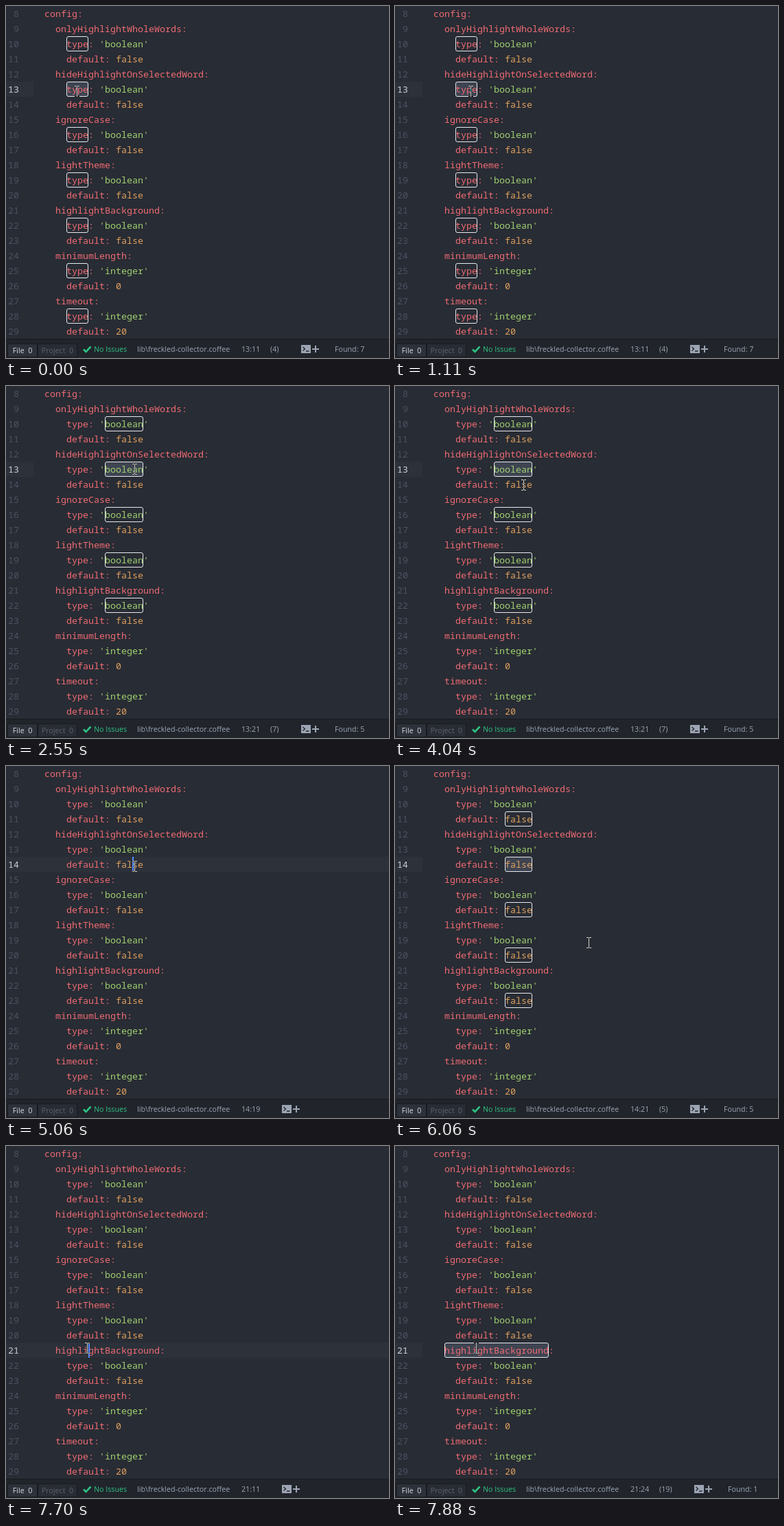
These frames come from a looping animation (558 by 512 pixels, 8 s). An HTML page:

```html
<!DOCTYPE html>
<html lang="en">
<head>
<meta charset="utf-8">
<title>Editor selection</title>
<style>
html, body { margin: 0; width: 100%; height: 100%; overflow: hidden; background: #282c34; }
#stage { position: relative; width: 558px; height: 512px; overflow: hidden; background: #282c34; isolation: isolate; }
#stage * { position: absolute; box-sizing: border-box; }
pre { margin: 0; top: 0; font: 13.333px/22px "Noto Sans Mono", monospace; font-variant-ligatures: none; }
#stage pre span { position: static; }
#nums { width: 19px; text-align: right; color: #4b5263; }
#nums .on { color: #c8cdd6; }
#code { left: 40px; color: #ef6b73; }
.str { color: #a0d070; }
.num { color: #e0a060; }
#line { left: 0; height: 22px; background: #2c313a; }
.box { height: 22px; border: 1px solid #e6e8ec; border-radius: 3px; }
.sel { background: #3e4451; }
#caret { width: 2px; height: 22px; background: #528bff; }
#bar { left: 0; top: 484px; width: 558px; height: 28px; background: #21252b; border-top: 1px solid #181a1f;
  font: 10.7px/16px "Open Sans", "Noto Sans", sans-serif; color: #9da5b4; }
#bar span { top: 6px; white-space: pre; }
#bar .tab { top: 6px; height: 20px; line-height: 18px; border: 1px solid #181a1f; text-align: center; }
#ibeam { left: 0; top: 0; mix-blend-mode: difference; }
</style>
</head>
<body>
<div id="stage">
  <div id="line"></div>
  <div id="boxes"></div>
  <pre id="nums"></pre>
  <pre id="code"></pre>
  <div id="caret"></div>
  <div id="bar">
    <span class="tab" style="left:2px;width:44px;background:#2c313a;color:#d7dae0">File  0</span>
    <span class="tab" style="left:46px;width:58px;background:#282c34;color:#5c6370">Project  0</span>
    <svg style="left:112px;top:9px" width="13" height="11"><path d="M1 5.5l3.5 3.5L11.5 1.5" fill="none" stroke="#2fc283" stroke-width="2.6"/></svg>
    <span style="left:128px;color:#2fc283">No Issues</span>
    <span style="left:191px">lib\freckled-collector.coffee</span>
    <span id="pos" style="left:343px"></span>
    <span id="count" style="left:385px"></span>
    <svg id="icons" style="top:8px" width="28" height="13">
      <path d="M0 0h14v12H0z" fill="#9da5b4"/>
      <path d="M2.5 3l3 2.7-3 2.7M7 9h4.5" fill="none" stroke="#21252b" stroke-width="1.3"/>
      <path d="M21 1v10M16 6h10" stroke="#9da5b4" stroke-width="2"/>
    </svg>
    <span id="found"></span>
  </div>
  <svg id="ibeam" width="7" height="16"><path d="M0 .5h3M4 .5h3M3.5 1v14M0 15.5h3M4 15.5h3" stroke="#fff"/></svg>
</div>
<script>
const $ = id => document.getElementById(id);
const FIRST = 8, ROW = 22, COL = 8, LEFT = 40, LOOP = 8000;

const options = [
  ["onlyHighlightWholeWords", "'boolean'", "false"],
  ["hideHighlightOnSelectedWord", "'boolean'", "false"],
  ["ignoreCase", "'boolean'", "false"],
  ["lightTheme", "'boolean'", "false"],
  ["highlightBackground", "'boolean'", "false"],
  ["minimumLength", "'integer'", "0"],
  ["timeout", "'integer'", "20"]
];
const lines = ["  config:", ...options.flatMap(([key, type, value]) =>
  [`    ${key}:`, `      type: ${type}`, `      default: ${value}`])];

$("code").innerHTML = lines.join("\n")
  .replace(/: ('\w+')/g, ': <span class="str">$1</span>')
  .replace(/: (\w+)/g, ': <span class="num">$1</span>');
$("nums").innerHTML = lines.map((_, i) => `<span>${i + FIRST}</span>`).join("\n");

// Editor states: start time, row, column, selected word (if any), x of the status icons
const states = [
  [0, 13, 11, "type", 430],
  [2380, 13, 19, "", 402],
  [2550, 13, 21, "boolean", 430],
  [5060, 14, 19, "", 402],
  [5230, 14, 21, "false", 430],
  [7700, 21, 11, "", 402],
  [7880, 21, 24, "highlightBackground", 436]
];

const linear = p => p;
const smooth = p => p * p * (3 - 2 * p);
// Pointer keys: time, left, top, easing used to arrive
const keys = [
  [0, 100, 116], [980, 100, 116], [1720, 184, 113, smooth],
  [3630, 184, 113], [4120, 184, 138, smooth],
  [5780, 184, 138], [6060, 279, 249], [6230, 308, 269],
  [6560, 308, 269], [7040, 115, 285, smooth],
  [7229, 115, 285], [7230, 115, 286], [LOOP, 115, 286]
];

function showState([, row, col, word, iconX]) {
  const top = (row - FIRST) * ROW;
  const boxes = [];
  if (word) lines.forEach((text, i) => {
    const at = text.search(new RegExp(`\\b${word}\\b`));
    if (at < 0) return;
    boxes.push(`<div class="box${i === row - FIRST ? " sel" : ""}" style="left:${LEFT + at * COL}px;` +
      `top:${i * ROW}px;width:${word.length * COL}px"></div>`);
  });
  $("boxes").innerHTML = boxes.join("");
  $("line").style.top = $("caret").style.top = top + "px";
  $("line").style.width = word ? LEFT + "px" : "100%";
  $("caret").style.left = LEFT + (col - 1) * COL + "px";
  $("caret").hidden = !!word;
  [...$("nums").children].forEach((n, i) => n.classList.toggle("on", i === row - FIRST));
  $("pos").textContent = `${row}:${col}`;
  $("count").textContent = word && `(${word.length})`;
  $("icons").style.left = iconX + "px";
  $("found").style.left = iconX + 49 + "px";
  $("found").textContent = word && `Found: ${boxes.length}`;
}

function movePointer(t) {
  const i = keys.findIndex(k => k[0] > t);
  const [t0, x0, y0] = keys[i - 1], [t1, x1, y1, ease = linear] = keys[i];
  const p = ease((t - t0) / (t1 - t0));
  const mix = (a, b) => Math.round(a + (b - a) * p);
  $("ibeam").style.transform = `translate(${mix(x0, x1)}px, ${mix(y0, y1)}px)`;
}

let shown;
const start = performance.now();
function draw() {
  const t = (performance.now() - start) % LOOP;
  const state = states.filter(s => s[0] <= t).pop();
  if (state !== shown) showState(shown = state);
  movePointer(t);
  requestAnimationFrame(draw);
}
draw();
</script>
</body>
</html>
```
